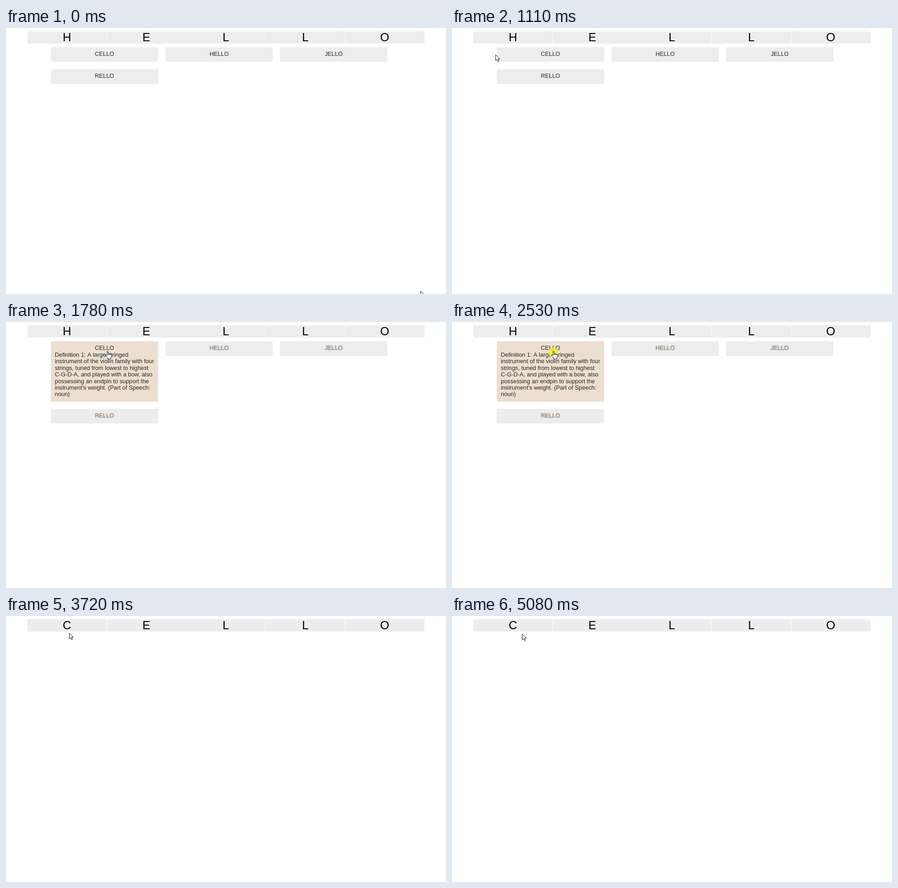
These frames come from a looping animation (962 px wide and 582 px high, 5.11 s). An HTML page with a canvas:

```html
<!DOCTYPE html>
<html lang="en">
<head>
<meta charset="utf-8">
<title>Word cards</title>
<style>
html, body { margin: 0; width: 100%; height: 100%; overflow: hidden; background: #fff; }
canvas { display: block; }
</style>
</head>
<body>
<canvas id="stage" width="962" height="582"></canvas>
<script>
const ctx = document.getElementById('stage').getContext('2d');
const LOOP = 5110, HOVER = 1140, PRESS = 2530, PICK = 2600;
const FONT = '"Liberation Sans", Arial, sans-serif';
const GREY = '#ededed', INK = '#262626';
const SIZE = 12.8, LINE = 14.4;
const LEFT = 98, TOP = 42, WIDTH = 234.6, GAP = 16;

const DEFINITION = [
  'Definition 1: A large stringed',
  'instrument of the violin family with four',
  'strings, tuned from lowest to highest',
  'C-G-D-A, and played with a bow, also',
  'possessing an endpin to support the',
  "instrument's weight. (Part of Speech:",
  'noun)'
];

// Pointer strokes: each bends from where the last one ended
const HOME = [908, 575];
const STROKES = [
  { from: 0, to: 530, bend: [400, 488], end: [133, 267] },
  { from: 530, to: 1110, bend: [28, 80], end: [95, 58] },
  { from: 1110, to: 1580, bend: [180, 46], end: [221, 63] },
  { from: 2850, to: 3380, bend: [222, 62], end: [135, 51] },
  { from: 3380, to: 3910, bend: [106, 30], end: [175, 41] },
  { from: 3970, to: 4260, bend: [150, 40], end: [112, 38] },
  { from: 4345, to: 4520, bend: [142, 42], end: [153, 42] },
  { from: 5030, to: 5080, bend: [153, 41], end: [153, 39] }
];

const ARROW = new Path2D('M.5 .5V13.2L3.5 10.4L5.5 15L7.6 14.1L5.6 9.7H9.5Z');
const HAND = new Path2D('M4 10.5V1.6Q5.2 0 6.5 1.6V6.6Q8 5.6 9 7Q10.6 6.1 11.5 7.6' +
  'Q13.4 7.1 13.6 9V12.5L12 16V18H5.5V16.4L1 11.6Q0 9.6 1.5 9Q3 9 4 10.5Z');

function pointer(t) {
  let pos = HOME;
  for (const { from, to, bend, end } of STROKES) {
    if (t < from) break;
    const u = Math.min(1, (t - from) / (to - from)), v = 1 - u;
    pos = pos.map((p, k) => v * v * p + 2 * u * v * bend[k] + u * u * end[k]);
  }
  return pos.map(Math.round);
}

function box(x, y, w, h, color) {
  ctx.fillStyle = color;
  ctx.fillRect(x, y, w, h);
}

function text(str, x, y, size = SIZE, color = INK, align = 'center') {
  ctx.font = size + 'px ' + FONT;
  ctx.textAlign = align;
  ctx.fillStyle = color;
  ctx.fillText(str, x, y);
}

function blurred(str, x, y) {
  ctx.save();
  ctx.shadowColor = 'rgba(80, 60, 40, .75)';
  ctx.shadowBlur = 2.5;
  text(str, x, y, SIZE, 'rgba(85, 68, 50, .55)');
  ctx.restore();
}

function header(word) {
  [...word].forEach((ch, i) => {
    const x = 47 + i * 173.7;
    box(Math.round(x), 7, 173, 27, GREY);
    text(ch, x + 86.2, 28.5, 25.6, '#000');
  });
}

function card(word, col, y, dim) {
  const x = LEFT + col * (WIDTH + GAP);
  box(x, y, WIDTH, 32, GREY);
  (dim ? blurred : text)(word, x + WIDTH / 2, y + 19);
}

function openCard(word) {
  box(LEFT, TOP, WIDTH, 132.4, '#ecdfd1');
  text(word, LEFT + WIDTH / 2, TOP + 19);
  DEFINITION.forEach((line, i) =>
    text(line, LEFT + 8.8, Math.round(TOP + 34 + i * LINE), SIZE, INK, 'left'));
}

function press(x, y) {
  ctx.fillStyle = 'rgba(248, 240, 40, .8)';
  ctx.beginPath();
  ctx.arc(x + .5, y + 3.5, 11, 0, Math.PI * 2);
  ctx.fill();
}

function cursor(shape, x, y) {
  ctx.save();
  ctx.translate(x, y);
  ctx.fillStyle = '#fff';
  ctx.strokeStyle = '#111';
  ctx.lineWidth = 1;
  ctx.fill(shape);
  ctx.stroke(shape);
  if (shape === HAND) {
    ctx.beginPath();
    for (let k = 6.5; k < 12; k += 2.5) {
      ctx.moveTo(k, 7);
      ctx.lineTo(k, 9.5);
    }
    ctx.stroke();
  }
  ctx.restore();
}

function draw(t) {
  const picked = t >= PICK;
  const hover = t >= HOVER && !picked;
  const [x, y] = pointer(t);
  box(0, 0, 962, 582, '#fff');
  header(picked ? 'CELLO' : 'HELLO');
  if (!picked) {
    if (hover) openCard('CELLO');
    else card('CELLO', 0, TOP);
    card('HELLO', 1, TOP, hover);
    card('JELLO', 2, TOP, hover);
    card('RELLO', 0, hover ? 190 : 90, hover);
    if (t >= PRESS) press(x, y);
  }
  if (hover) cursor(HAND, x - 4, y);
  else cursor(ARROW, x, y);
}

const start = performance.now();
function tick(now) {
  draw(Math.max(0, now - start) % LOOP);
  requestAnimationFrame(tick);
}
draw(0);
requestAnimationFrame(tick);
</script>
</body>
</html>
```
